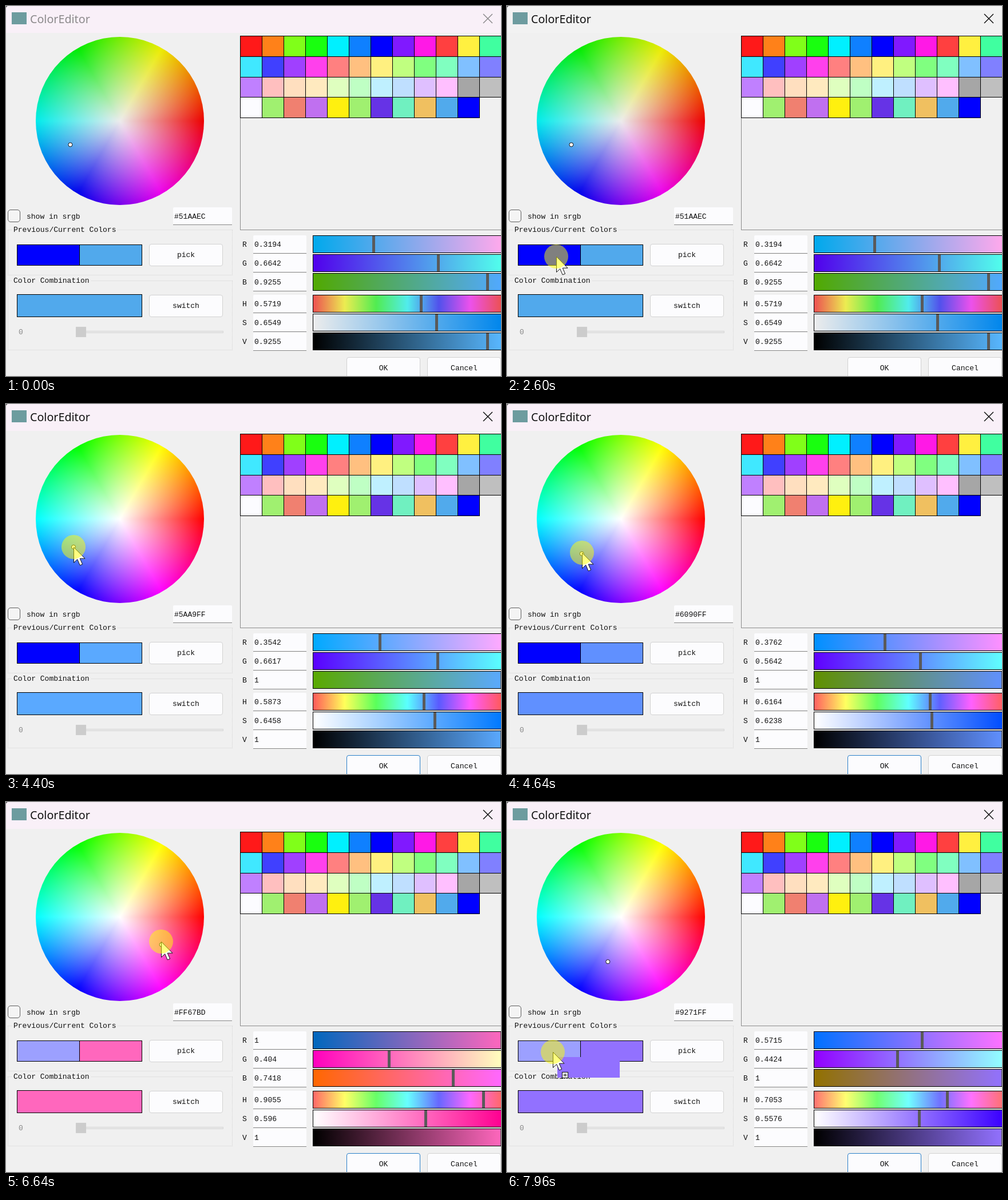
Write an HTML page that moves like this. It is 865x647 px and loops after 8 s.

```html
<!DOCTYPE html>
<html lang="en">
<head>
<meta charset="utf-8">
<title>ColorEditor</title>
<style>
html, body { margin: 0; width: 100%; height: 100%; overflow: hidden; background: #f0f0f0; }
#stage { position: absolute; left: 0; top: 0; width: 865px; height: 647px; overflow: hidden;
  background: #f0f0f0; color: #111; font: 13px/20px "Liberation Mono", monospace; }
#stage div, #stage svg { position: absolute; box-sizing: border-box; white-space: pre; }
.field { background: #fcfcfe; border-bottom: 1px solid #868686; border-radius: 2px 2px 0 0; }
.button { background: #fcfcfe; border: 1px solid #d2d2d2; border-radius: 4px; text-align: center; line-height: 38px; }
.group { border: 1px dotted #d4d4d4; }
.legend { background: #f0f0f0; padding: 0 2px; }
.ink { border: 1px solid #000; }
.wheel { border-radius: 50%;
  background: radial-gradient(closest-side, #fff, rgba(255,255,255,0)),
    conic-gradient(from 90deg, #f00, #f0f, #00f, #0ff, #0f0, #ff0, #f00); }
.shade { border-radius: 50%; background: #000; }
.knob { background: #5a5a5a; }
.halo { border-radius: 50%; background: rgba(255,255,0,.5); }
.title { font: 19.7px/28px "Noto Sans", "Open Sans", sans-serif; }
</style>
</head>
<body>
<div id="stage"></div>
<script>
const stage = document.getElementById('stage');
const LOOP = 8000, CX = 199, CY = 200.5, RADIUS = 147, TRACK_X = 537, TRACK_W = 329;

function box(x, y, w, h, cls = '', css = '', text = '') {
  const el = document.createElement('div');
  el.className = cls;
  el.style.cssText = `left:${x}px;top:${y}px;width:${w}px;height:${h}px;${css}`;
  el.textContent = text;
  stage.append(el);
  return el;
}
const label = (x, baseline, text, cls = '', css = '') => {
  const el = box(x, baseline - 14, 0, 20, cls, css, text);
  el.style.width = 'auto';
  return el;
};
function svg(w, h, body) {
  const holder = box(0, 0, w, h);
  holder.innerHTML = `<svg width="${w}" height="${h}" style="overflow:visible">${body}</svg>`;
  return holder;
}

// Title bar
const bar = box(0, 0, 865, 47);
box(0, 0, 4, 4, '', 'background:radial-gradient(circle at 100% 100%,transparent 3.5px,#444 4.5px)');
box(10, 11, 26, 21, '', 'background:#6d9c9f');
const title = box(42, 9, 120, 28, 'title', '', 'ColorEditor');
const cross = svg(18, 18, '<path d="M1 1L17 17M17 1L1 17" fill="none" stroke="currentColor" stroke-width="1.5"/>');
cross.style.left = '833px';
cross.style.top = '13px';

// Wheel
box(CX - RADIUS, CY - RADIUS, 2 * RADIUS, 2 * RADIUS, 'wheel');
const shade = box(CX - RADIUS, CY - RADIUS, 2 * RADIUS, 2 * RADIUS, 'shade');
const marker = box(0, 0, 8, 8, '', 'background:#fff;border:1px solid #111;border-radius:50%');

// Left panel
box(3, 356, 22, 22, '', 'border:1.5px solid #5c5c5c;border-radius:5px;background:#f4f4f4');
label(36, 373, 'show in srgb');
box(292, 352, 103, 31, 'field');
const hexText = label(294, 373, '');
box(3, 391, 393, 80, 'group');
label(11, 396, 'Previous/Current Colors', 'legend');
box(3, 480, 393, 122, 'group');
label(11, 485, 'Color Combination', 'legend');
const previous = box(19, 417, 110, 37, 'ink');
const current = box(128, 417, 110, 37, 'ink');
const combined = box(19, 504, 219, 40, 'ink');
box(250, 416, 129, 39, 'button', '', 'pick');
box(250, 505, 129, 39, 'button', '', 'switch');
label(22, 575, '0', '', 'color:#8a8a8a');
box(122, 568, 258, 4, '', 'background:#e7e7e7;border:1px solid #d8d8d8');
box(122, 561, 18, 18, '', 'background:#ccc');

// Palette
box(409, 52, 470, 340, '', 'border:1px solid #8c8c8c');
const palette = `ff1919 ff8119 80ff19 19ff0f 00f0ff 0f80ff 0000ff 8019ff ff19e6 ff4040 fff040 40ffa0
40e8ff 4040ff a040ff ff40ec ff8080 ffc080 fff080 c0ff80 80ff80 80ffc0 80c0ff 8080ff
c080ff ffbfbf ffdfbf ffeabf dfffbf bfffc4 bff0ff bfdfff dfbfff ffbfff a6a6a6 bfbfbf
fcfcff a0f070 f08070 c070f0 fff00f a0f070 6633e6 70f0c0 f0c060 51aaec 0000ff`.split(/\s+/);
const rowTop = r => Math.round(52 + 35.75 * r);
palette.forEach((c, i) => {
  const r = Math.floor(i / 12);
  box(409 + 38 * (i % 12), rowTop(r), 39, rowTop(r + 1) - rowTop(r) + 1, 'ink', `background:#${c}`);
});

// Channel rows
const rows = [...'RGBHSV'].map((name, i) => {
  const y = 401 + 33 * i + (i > 2 ? 5 : 0);
  label(413, y + 21, name);
  box(432, y, 93, 32, 'field');
  return {
    value: label(434, y + 21, ''),
    track: box(536, y, TRACK_W + 2, 31, 'ink'),
    knob: box(0, y + 1, 5, 29, 'knob')
  };
});
const ok = box(595, 614, 129, 39, 'button', '', 'OK');
box(736, 614, 129, 39, 'button', '', 'Cancel');

// Pointer layers
const ghost = box(0, 0, 109, 36);
const plus = svg(11, 11, `<rect x=".5" y=".5" width="10" height="10" fill="#fff" stroke="#111"/>
  <path d="M2.5 5.5h6M5.5 2.5v6" stroke="#111"/>`);
const arrow = svg(22, 34, `<path d="M.5 .5V27.5L6.7 21.6L11.2 32L15.6 30.2L11.2 20.2H20Z"
  fill="#fff" stroke="#111"/>`);
const halo = box(0, 0, 42, 42, 'halo');

function hsv(h, s, v) {
  return [5, 3, 1].map(n => {
    const k = (n + h * 6) % 6;
    return v - v * s * Math.max(0, Math.min(k, 4 - k, 1));
  });
}
const bytes = c => c.map(x => Math.round(x * 255));
const css = c => `rgb(${bytes(c)})`;
const ramp = colors => `linear-gradient(90deg,${colors.map(css)})`;
const onWheel = (h, s) => [CX + RADIUS * s * Math.cos(h * 2 * Math.PI), CY - RADIUS * s * Math.sin(h * 2 * Math.PI)];

const sky = onWheel(.57186, .6549), blue = onWheel(2 / 3, 1), steel = onWheel(.61644, .6238),
  lilac = onWheel(.6598, .3881), pink = onWheel(.90554, .596), violet = onWheel(.70526, .5576);

// Repeated times make hard jumps.
const markerKeys = [
  [0, ...sky], [3080, ...sky], [3080, ...blue], [4080, ...blue], [4080, 112, 240], [4400, 118, 250],
  [4640, ...steel], [4960, ...lilac], [6440, ...lilac], [6440, 262, 262], [6640, ...pink],
  [6760, 265, 228], [6920, 215, 285], [7120, ...violet], [LOOP, ...violet]
];
const pointerKeys = [
  [600, 356, 648], [1320, 200, 446], [1800, 200, 446], [2520, 86, 438], [2640, 86, 438], [3080, 163, 434],
  [3640, 163, 434], [4080, 112, 240], [4400, 118, 250], [4640, 131, 260], [4960, 168, 248], [5000, 168, 248],
  [5240, 179, 365], [5400, 170, 437], [5480, 170, 437], [5880, 64, 437], [6120, 64, 437], [6440, 262, 262],
  [6640, 271, 244], [6760, 265, 228], [6920, 215, 285], [7120, 176, 279], [7160, 176, 279],
  [7520, 172, 437], [7760, 172, 437], [7960, 80, 437], [LOOP, 80, 437]
];
const presses = [[2560, 3080], [4080, 5000], [5440, 5920], [6440, 7160], [7760, LOOP]];
const drags = [[2680, 3080], [5520, 5920], [7800, LOOP]];

const within = (spans, t) => spans.some(([a, b]) => t >= a && t < b);
const progress = (t, a, b) => Math.max(0, Math.min(1, (t - a) / (b - a)));
function follow(keys, t) {
  const i = Math.max(0, keys.findLastIndex(k => k[0] <= t));
  const a = keys[i], b = keys[i + 1] || a;
  const p = b === a ? 0 : progress(t, a[0], b[0]);
  const e = p * p * (3 - 2 * p);
  return [a[1] + (b[1] - a[1]) * e, a[2] + (b[2] - a[2]) * e];
}
const place = (el, x, y) => { el.style.transform = `translate(${x}px,${y}px)`; };
const show = (el, on) => { el.style.display = on ? '' : 'none'; };

function drawColor(t) {
  const [mx, my] = follow(markerKeys, t);
  const dx = mx - CX, dy = CY - my;
  const h = (Math.atan2(dy, dx) / (2 * Math.PI) + 1) % 1;
  const s = Math.min(1, Math.hypot(dx, dy) / RADIUS);
  const v = t < 3080 ? .9255 : 1;
  const rgb = hsv(h, s, v);
  const swap = (i, x) => rgb.map((c, j) => j === i ? x : c);
  const ramps = [
    ...[0, 1, 2].map(i => [swap(i, 0), swap(i, 1)]),
    Array.from({ length: 7 }, (_, i) => hsv(i / 6, s, v)),
    [hsv(h, 0, v), hsv(h, 1, v)],
    [hsv(h, s, 0), hsv(h, s, 1)]
  ];
  [...rgb, h, s, v].forEach((x, i) => {
    rows[i].value.textContent = String(+x.toFixed(4));
    rows[i].track.style.background = ramp(ramps[i]);
    place(rows[i].knob, Math.round(TRACK_X + TRACK_W * x - 2.5), 0);
  });
  place(marker, mx - 4, my - 4);
  shade.style.opacity = 1 - v;
  const hex = bytes(rgb).map(b => b.toString(16).padStart(2, '0')).join('').toUpperCase();
  hexText.textContent = t < 3080 ? '#51AAEC' : '#' + hex;
  const now = css(rgb);
  const before = t < 5920 ? '#00f' : css(hsv(.6598, .3881, 1));
  current.style.background = combined.style.background = now;
  previous.style.background = before;
  ghost.style.background = t < 3080 ? before : now;
}

function drawPointer(t) {
  const [x, y] = follow(pointerKeys, t).map(Math.round);
  const dragging = within(drags, t);
  show(arrow, t >= 600);
  show(halo, within(presses, t));
  show(ghost, dragging);
  show(plus, dragging);
  place(arrow, x, y);
  place(halo, x - 21, y - 21);
  place(ghost, x + 8, y + 9);
  place(plus, x + 16, y + 35);
}

function drawWindow(t) {
  const tint = 1 - progress(t, 40, 200) + progress(t, 2600, 2760);
  bar.style.background = `rgb(${242 + 7 * tint},${242 - 2 * tint},${242 + 6 * tint})`;
  title.style.color = cross.style.color = t < 2560 ? '#8c8a8c' : '#111';
  ok.style.borderColor = t < 2680 ? '#d2d2d2' : '#2a7fc9';
}

function frame() {
  const t = Math.floor(performance.now() % LOOP / 40) * 40;
  drawWindow(t);
  drawColor(t);
  drawPointer(t);
  requestAnimationFrame(frame);
}
frame();
</script>
</body>
</html>
```
